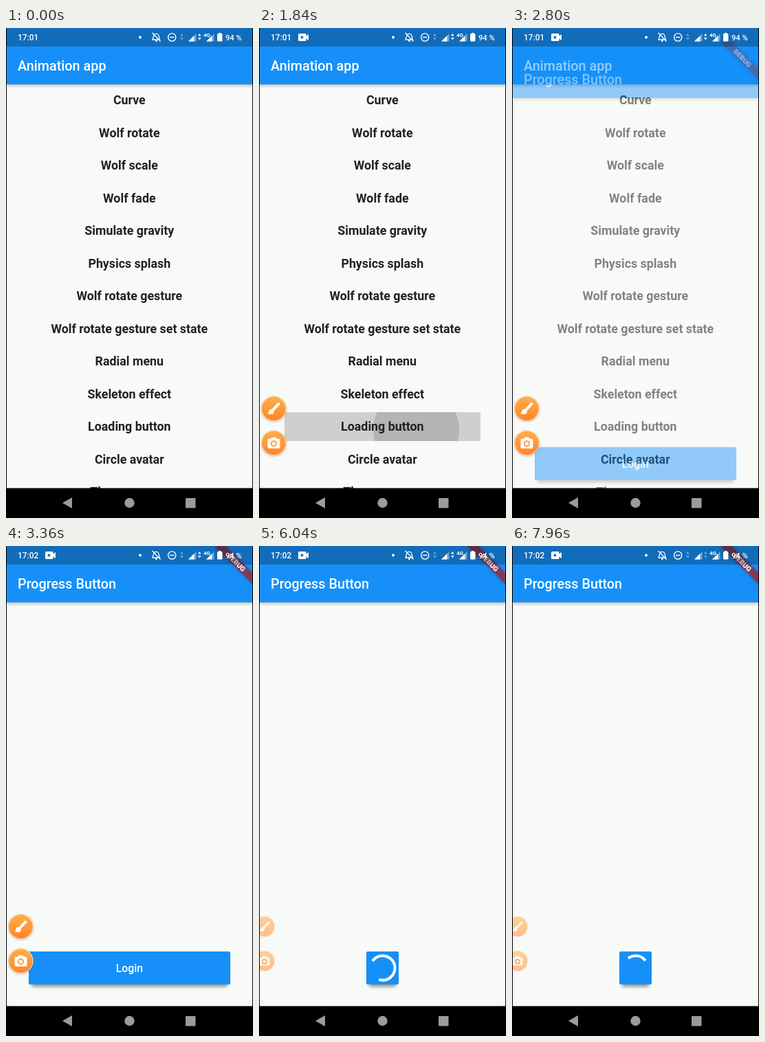
An HTML page with a canvas for the animation above (8 s loop, 359 by 713 pixels).

```html
<!DOCTYPE html>
<html lang="en">
<head>
<meta charset="utf-8">
<title>Animation app</title>
<style>
  html, body { margin: 0; width: 100%; height: 100%; overflow: hidden; background: #000; }
  canvas { display: block; }
</style>
</head>
<body>
<canvas id="stage" width="359" height="713"></canvas>
<script>
const W = 359, H = 713, LOOP = 8000, TICK = 40;
const NAV_TOP = 669.5, CENTER = 179.3;
const BLUE = '#1690f8', PAPER = '#f8faf8', WHITE = '#fff', GREY = '#9b9b9b';
const FONT = 'Roboto, sans-serif';
const ROWS = ['Curve', 'Wolf rotate', 'Wolf scale', 'Wolf fade', 'Simulate gravity',
  'Physics splash', 'Wolf rotate gesture', 'Wolf rotate gesture set state', 'Radial menu',
  'Skeleton effect', 'Loading button', 'Circle avatar', 'Theme menus'];

const screen = document.getElementById('stage').getContext('2d');
const layerCanvas = document.createElement('canvas');
layerCanvas.width = W;
layerCanvas.height = H;
const layer = layerCanvas.getContext('2d');

const clamp = v => Math.min(1, Math.max(0, v));
const mix = (a, b, k) => a + (b - a) * k;
const ramp = (t, from, to) => clamp((t - from) / (to - from));

function bezier(x1, y1, x2, y2) {
  const at = (a, b, s) => 3 * (1 - s) ** 2 * s * a + 3 * (1 - s) * s * s * b + s ** 3;
  return x => {
    if (x <= 0 || x >= 1) return clamp(x);
    let lo = 0, hi = 1;
    for (let i = 0; i < 24; i++) {
      const mid = (lo + hi) / 2;
      if (at(x1, x2, mid) < x) lo = mid; else hi = mid;
    }
    return at(y1, y2, lo);
  };
}
const fastOutSlowIn = bezier(0.4, 0, 0.2, 1);
const easeIn = bezier(0.42, 0, 1, 1);

function text(c, label, x, y, size, weight, color, align = 'left') {
  c.font = `${weight} ${size}px ${FONT}`;
  c.textAlign = align;
  c.fillStyle = color;
  c.fillText(label, x, y);
}

function triangle(c, color, ...points) {
  c.fillStyle = color;
  c.beginPath();
  points.forEach(([x, y]) => c.lineTo(x, y));
  c.fill();
}

function disc(c, x, y, r, color) {
  c.fillStyle = color;
  c.beginPath();
  c.arc(x, y, r, 0, Math.PI * 2);
  c.fill();
}

function box(c, x, y, w, h, r, color) {
  c.fillStyle = color;
  c.beginPath();
  c.roundRect(x, y, w, h, r);
  c.fill();
}

function line(c, width, x1, y1, x2, y2) {
  c.strokeStyle = WHITE;
  c.lineWidth = width;
  c.beginPath();
  c.moveTo(x1, y1);
  c.lineTo(x2, y2);
  c.stroke();
}

function withShadow(c, blur, dy, alpha, draw) {
  c.save();
  c.shadowColor = `rgba(0,0,0,${alpha})`;
  c.shadowBlur = blur;
  c.shadowOffsetY = dy;
  draw();
  c.restore();
}

function clipped(c, rect, draw) {
  c.save();
  c.beginPath();
  c.roundRect(...rect);
  c.clip();
  draw();
  c.restore();
}

function appBar(c, title) {
  withShadow(c, 5, 1.5, 0.32, () => box(c, 0, 0, W, 82, 0, BLUE));
  text(c, title, 17, 62, 19.8, 500, WHITE);
}

function pressedRow(c, t) {
  const row = [37, 559, 285, 42, 2];
  clipped(c, row, () => {
    c.globalAlpha = ramp(t, 1600, 1760) * (1 - ramp(t, 1920, 2200));
    box(c, ...row, 'rgba(0,0,0,0.17)');
    const radius = 62.5 * ramp(t, 1580, 1840) + 140 * ramp(t, 1840, 2080);
    disc(c, 228.5, 585, radius, 'rgba(0,0,0,0.13)');
  });
}

function listPage(c, t) {
  box(c, 0, 0, W, H, 0, PAPER);
  pressedRow(c, t);
  ROWS.forEach((label, i) =>
    text(c, label, CENTER, 111.3 + 47.5 * i, 17.82, 700, '#212121', 'center'));
  appBar(c, 'Animation app');
}

function spinner(c, t) {
  const turns = 0.085 + 1.225 * ramp(t, 4880, 6040) + 1.825 * ramp(t, 6040, 7960);
  const step = Math.floor(turns), phase = turns - step;
  const head = fastOutSlowIn(clamp(phase * 2));
  const tail = fastOutSlowIn(clamp(phase * 2 - 1));
  const start = Math.PI * (-0.5 + 1.5 * tail + 1.7 * phase - 0.8 * step);
  c.strokeStyle = WHITE;
  c.lineWidth = 4;
  c.lineCap = 'square';
  c.beginPath();
  c.arc(179.7, 614, 17.8, start, start + Math.max(0.001, 1.5 * Math.PI * (head - tail)));
  c.stroke();
}

function loginButton(c, t) {
  const half = mix(146.5, 23.5, ramp(t, 4850, 4950));
  const press = ramp(t, 4720, 4800) * (1 - ramp(t, 4920, 5320));
  const left = 179.5 - half, outline = [left, 590, half * 2, 48, 2];
  const inset = mix(4, 0, press);
  withShadow(c, mix(5, 11, press), mix(3, 5, press), mix(0.45, 0.55, press),
    () => box(c, left + inset, 596, (half - inset) * 2, 42, 2, BLUE));
  box(c, ...outline, BLUE);
  clipped(c, outline, () => {
    c.globalAlpha = press;
    box(c, ...outline, 'rgba(0,0,0,0.08)');
    disc(c, 266, 604, 17.5 * ramp(t, 4700, 4880) + 50 * ramp(t, 4880, 5120), 'rgba(0,0,0,0.12)');
    c.globalAlpha = 1;
    if (t < 4800) text(c, 'Login', CENTER, 619.7, 15.8, 500, WHITE, 'center');
    else spinner(c, t);
  });
}

function debugBanner(c) {
  c.save();
  c.translate(W, 0);
  c.rotate(Math.PI / 4);
  withShadow(c, 6, 0, 0.3, () => box(c, -40, 28, 80, 12, 0, 'rgba(183,28,28,0.63)'));
  text(c, 'DEBUG', 0, 37.6, 10, 900, WHITE, 'center');
  c.restore();
}

function buttonPage(c, t) {
  box(c, 0, 0, W, H, 0, PAPER);
  appBar(c, 'Progress Button');
  loginButton(c, t);
  debugBanner(c);
}

function trafficArrows(c, x, color) {
  for (const side of [-1, 1]) {
    const y = 12.8 + side * 1.2;
    triangle(c, color, [x - 2.3, y], [x + 2.3, y], [x, y + side * 3.6]);
  }
}

function signal(c, x) {
  const y = 19.5, part = (w, color) => triangle(c, color, [x, y], [x + w, y], [x + w, y - w]);
  part(11.5, 'rgba(255,255,255,0.4)');
  part(8.3, WHITE);
}

function cameraBadge(c, t) {
  c.globalAlpha = ramp(t, 200, 440);
  box(c, 57, 8, 11.5, 11, 1.5, WHITE);
  triangle(c, WHITE, [66, 13.5], [72, 9], [72, 18]);
  disc(c, 62.5, 13.5, 1.9, '#126cba');
  c.globalAlpha = 1;
}

function mutedBell(c) {
  c.strokeStyle = WHITE;
  c.lineWidth = 1.3;
  c.beginPath();
  c.arc(218.3, 12, 3.7, Math.PI, 0);
  c.lineTo(223.5, 17);
  c.lineTo(213, 17);
  c.closePath();
  c.stroke();
  disc(c, 218.3, 18.8, 1.4, WHITE);
  line(c, 1.3, 212.5, 7, 224.5, 19.5);
}

function doNotDisturb(c) {
  c.lineWidth = 1.4;
  c.beginPath();
  c.arc(241.2, 13.5, 5.6, 0, Math.PI * 2);
  c.stroke();
  line(c, 1.5, 238, 13.5, 244.4, 13.5);
}

function statusBar(c, t) {
  const dim = 'rgba(255,255,255,0.42)';
  box(c, 0, 0, W, 27, 0, 'rgba(0,0,0,0.25)');
  text(c, t < 3200 ? '17:01' : '17:02', 17, 17.8, 11.9, 500, WHITE);
  cameraBadge(c, t);
  disc(c, 195, 13.4, 2, WHITE);
  mutedBell(c);
  doNotDisturb(c);
  trafficArrows(c, 255.5, dim);
  signal(c, 265);
  trafficArrows(c, 281.3, t < 7000 ? WHITE : dim);
  text(c, '4G', 287, 12.8, 8, 700, WHITE);
  signal(c, 291);
  box(c, 307, 8.3, 7.4, 11.2, 1, WHITE);
  box(c, 309, 7, 3.4, 2, 0, WHITE);
  text(c, '94 %', 319, 17.8, 11.2, 500, WHITE);
}

function navBar(c) {
  box(c, 0, NAV_TOP, W, H - NAV_TOP, 0, '#000');
  triangle(c, GREY, [82, 691], [96, 683], [96, 699]);
  disc(c, 179.5, 691, 7.2, GREY);
  box(c, 261, 684, 14.5, 14.5, 1, GREY);
}

function brushGlyph(c) {
  c.lineCap = 'round';
  line(c, 4, -0.5, 1, 7, -6.8);
  disc(c, -3.4, 4.4, 3.7, WHITE);
  triangle(c, WHITE, [-7, 4], [-3, 8], [-9, 7.6]);
}

function cameraGlyph(c) {
  box(c, -9, -6, 18, 14, 2, WHITE);
  box(c, -4, -8.3, 8, 4, 1.5, WHITE);
  disc(c, 0, 1, 4.6, '#ff9632');
  disc(c, 0, 1, 2.8, WHITE);
}

function floatingButton(c, t, y, glyph) {
  const x = mix(-22, 21.5, ramp(t, 40, 520)) - 13.5 * ramp(t, 4280, 4520);
  const rest = ramp(t, 4720, 4880), scale = mix(1, 0.84, rest);
  c.save();
  c.globalAlpha = ramp(t, 40, 400) * mix(1, 0.44, rest);
  c.translate(x, y);
  c.scale(scale, scale);
  withShadow(c, 3, 1, 0.25 * (1 - rest), () => disc(c, 0, 0, 18.3, '#ffd9b0'));
  const fill = c.createLinearGradient(0, -17, 0, 17);
  fill.addColorStop(0, '#ffae4a');
  fill.addColorStop(1, '#ff8429');
  disc(c, 0, 0, 17.2, fill);
  c.globalAlpha = mix(c.globalAlpha, 0.8, rest);
  glyph(c);
  c.restore();
}

function paint(t) {
  const c = screen;
  const progress = ramp(t, 2615, 2915);
  if (progress < 1) listPage(c, t);
  if (progress > 0) {
    layer.clearRect(0, 0, W, H);
    buttonPage(layer, t);
    c.globalAlpha = easeIn(progress);
    c.drawImage(layerCanvas, 0, (1 - fastOutSlowIn(progress)) * H / 4);
    c.globalAlpha = 1;
  }
  statusBar(c, t);
  navBar(c);
  floatingButton(c, t, 553.8, brushGlyph);
  floatingButton(c, t, 603.8, cameraGlyph);
  box(c, 0, 0, 1, H, 0, '#000');
  box(c, W - 1, 0, 1, H, 0, '#000');
}

const began = performance.now();
function tick() {
  const t = (performance.now() - began) % LOOP;
  paint(Math.floor(t / TICK) * TICK);
  requestAnimationFrame(tick);
}
tick();
</script>
</body>
</html>
```
